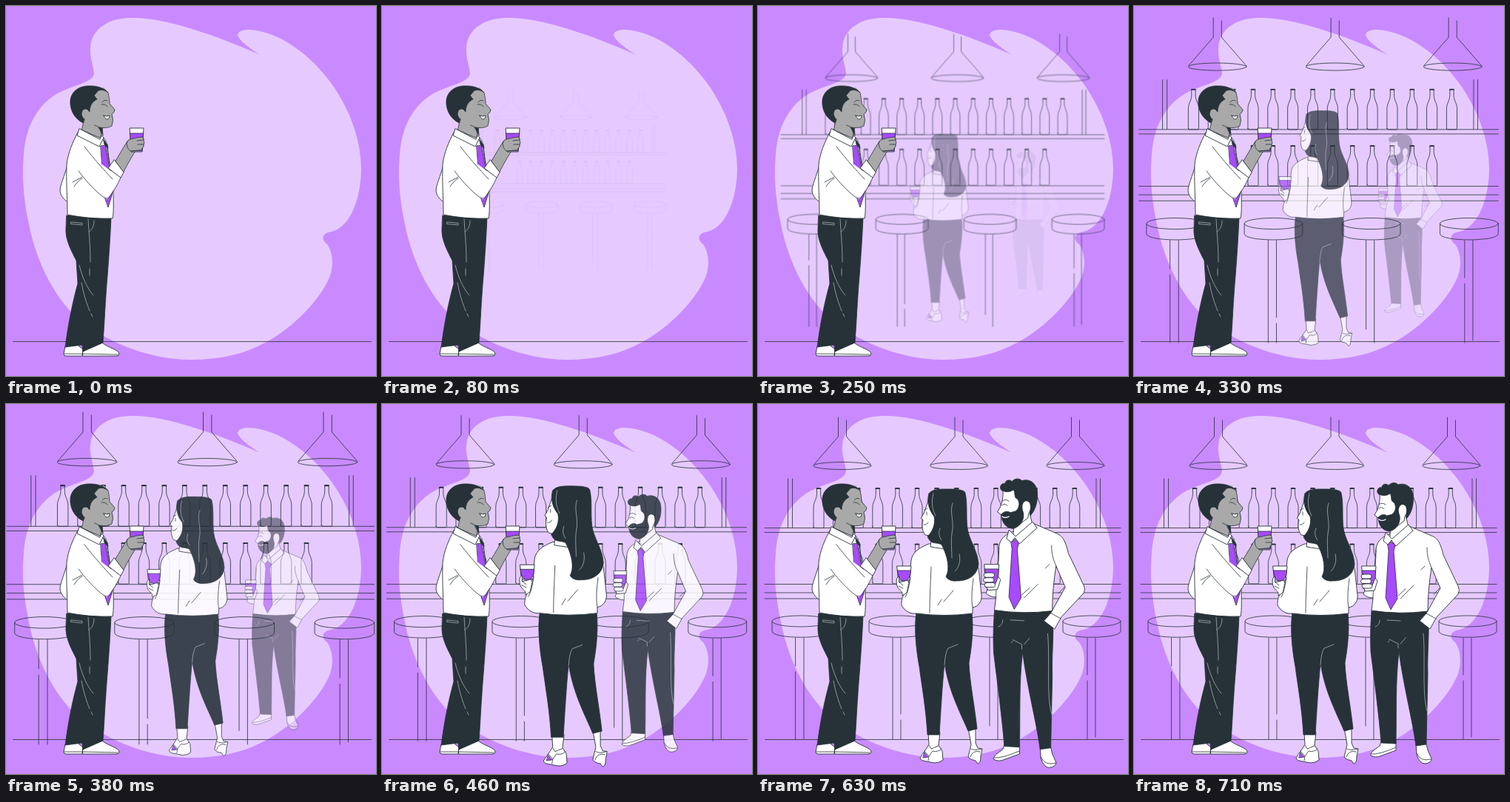
Write an HTML page without scripts that moves like this. It is 500 px wide and 500 px high and loops after 750 ms.

```html
<!DOCTYPE html>
<html lang="en">
<head>
<meta charset="utf-8">
<title>After-work drinks</title>
<style>
  html, body { margin: 0; width: 100%; height: 100%; overflow: hidden; background: #c98aff; }
  svg { display: block; width: 100%; height: 100%; stroke-linecap: round; stroke-linejoin: round; }

  .line { fill: none; stroke: #263238; stroke-width: .8; }
  .white { fill: #fff; stroke: #263238; stroke-width: .9; }
  .skin { fill: #a9a9a9; stroke: #263238; stroke-width: .8; }
  .dark { fill: #263238; stroke: #263238; stroke-width: .8; }
  .accent { fill: #a84aff; stroke: #263238; stroke-width: .8; }
  .seam { fill: none; stroke: #a9afb2; stroke-width: .8; }

  /* Progress is a property of its own, so lines are redrawn sharp at every scale */
  @property --p { syntax: "<number>"; inherits: false; initial-value: 1; }
  .pop {
    opacity: var(--p);
    transform: scale(calc(.5 + .5 * var(--p)));
    animation: 750ms cubic-bezier(.36, -.01, .5, 1.38) infinite;
  }
  #bar { transform-origin: 250px 236px; animation-name: bar-in; animation-timing-function: cubic-bezier(.332, -.01, .488, 1.38); }
  #woman { transform-origin: 245px 299.5px; animation-name: woman-in; }
  #guest { transform-origin: 373px 297px; animation-name: guest-in; }
  @keyframes bar-in { 0% { --p: 0; } 63.5%, 100% { --p: 1; } }
  @keyframes woman-in { 0%, 12% { --p: 0; } 78.4%, 100% { --p: 1; } }
  @keyframes guest-in { 0%, 24.9% { --p: 0; } 91.3%, 100% { --p: 1; } }
</style>
</head>
<body>
<svg viewBox="0 0 500 500">
  <defs>
    <g id="lamp">
      <path d="M-5.5 18V44L-38.5 82M5.5 22V44L38.5 82"/>
      <ellipse cy="83.5" rx="39" ry="5"/>
    </g>
    <g id="bottle">
      <path d="M-7 -2V-28C-7 -36 -3 -38 -2.6 -46V-54.5H2.6V-46C3 -38 7 -36 7 -28V-2Q7 -.5 5.5 -.5H-5.5Q-7 -.5 -7 -2Z"/>
      <path d="M-2.6 -53.8H2.6" stroke-width="1.6"/>
    </g>
    <g id="pair"><use href="#bottle"/><use href="#bottle" x="26.6"/></g>
    <g id="four"><use href="#pair"/><use href="#pair" x="53.2"/></g>
    <g id="eight"><use href="#four"/><use href="#four" x="106.4"/></g>
    <g id="seat">
      <ellipse cy="293.5" rx="39" ry="7.5"/>
      <path d="M-39 294V307C-39 318 39 318 39 307V294"/>
    </g>
    <rect id="finger" class="white" width="14" height="6" rx="3"/>
  </defs>

  <rect width="500" height="500" fill="#c98aff"/>
  <path fill="#e6caff" d="M114 57C115 30 140 16 170 16C215 15 290 42 343 66C330 57 317 49 313 40C313 34 320 32 328 32C372 34 415 70 440 105C468 145 480 185 480 222C479 262 465 302 435 306C427 309 426 316 434 322C441 332 444 350 437 367C425 396 385 440 340 460C305 477 260 480 230 477C180 472 135 452 100 425C60 390 38 335 30 290C22 250 22 225 24 200C27 158 47 125 83 112C101 105 118 101 119 91C118 80 113 70 114 57Z"/>
  <path class="line" d="M9.5 453.5H493.5"/>

  <g id="bar" class="pop line">
    <use href="#lamp" x="114"/><use href="#lamp" x="271.5"/><use href="#lamp" x="429"/>
    <path d="M40.5 101V167M46.500 101V167M457 101V167M462.500 101V167M9 167.500H490M9 173.500H490M9 243.500H490M9 255H490M9 263H490"/>
    <g transform="translate(82 168)">
      <use href="#eight"/><use href="#four" x="212.8"/><use href="#pair" x="319.2"/>
    </g>
    <g transform="translate(135.2 243.5)">
      <use href="#eight"/><use href="#pair" x="212.8"/><use href="#bottle" x="266"/>
    </g>
    <use href="#seat" x="58"/><use href="#seat" x="189"/><use href="#seat" x="320"/><use href="#seat" x="451"/>
    <path d="M50.5 316V354M50.5 362V453M62 316V453M182 316V453M193 316V419M193 427V453M313 316V435M324 316V453M445 316V366M445 374V453M456 316V450"/>
  </g>

  <g id="host">
    <path class="white" d="M83 215C79 230 73 242 73 250C74 258 80 263 85 266Z"/>
    <path class="white" d="M80 460L78 470Q78 473 81 473H103L104 464L94 456Z"/>
    <path class="white" d="M104 465L130 455C138 462 152 464 153 470Q153 473 149 473H104Z"/>
    <path class="line" d="M79 470H103M104 470L151 471"/>
    <path class="dark" d="M82 283L142 286C141 310 139 340 137 365C134 400 133 430 131 455L104 467L103 458L80 461C84 430 90 400 97 375L95 344C85 325 80 313 81 300Z"/>
    <path class="seam" d="M88 292L103 293.5V296L88 294.5ZM111 288C112 305 114 325 114 346M113 355V364M119 290C119 298 116 303 112 305M99 350C103 367 110 382 118 391M102 374C105 390 109 402 113 412M115 416L117 420"/>
    <path class="skin" d="M106 150L102 170L127 184L130 164Z"/>
    <path class="dark" d="M125 163L130 163L131 175Z"/>
    <path class="white" d="M97 171C90 184 84 198 82 214C81 235 83 260 83 282Q112 288 144 287C146 278 145 262 145 252L137 190L131 180L101 167Z"/>
    <path class="accent" d="M128 189L134 188L144 240L143 256L138 272L133 258Z"/>
    <path class="dark" d="M132 181L137 187L138 193L133 187Z"/>
    <path class="white" d="M99 166L96 175L126 190L132 178L129 175L127 180Z"/>
    <path class="line" d="M132 178L136 184M135 186C137 197 139 211 142 221"/>
    <path fill="#fff" d="M102 193L143 224L155 232C149 242 143 253 137 261C129 259 117 248 98 226Z"/>
    <path class="line" d="M106 190C112 198 126 215 144 234M98 223C111 240 121 250 130 257Q136 262 140 258C146 250 151 241 155 232M90 238L103 231M92 244C96 238 100 234 103 233"/>
    <path class="skin" d="M147 211C153 201 158 192 164 183L172 178L180 188C172 200 165 212 159 224Z"/>
    <path class="white" d="M146 208L138 219L155 232L159 225Z"/>
    <path class="white" d="M167.5 165H186L184 197H169.500Z"/>
    <path class="accent" d="M168 172H185.5L184 196H169.500Z"/>
    <path class="skin" d="M164 183C166 179 172 180 176 178L184 177Q187 178 186 182Q188 185 186 187Q187 191 184 192Q184 195 179 195L168 196C164 193 162 187 164 183Z"/>
    <path class="line" d="M177 182L186 181M178 187L186 187"/>
    <path fill="#a9a9a9" d="M115 115L132 110Q138 115 139 124L140 132L147 140Q147 144 143 146Q146 154 143 162Q136 166 126 164L105 157L103 140Z"/>
    <path class="line" d="M138 117Q140 125 140 132L147 140Q147 144 143 146Q146 154 143 162Q136 166 126 164L120 161M129 133Q134 132 137 136M130 130Q133 126 137 128"/>
    <path class="white" d="M132 148Q136 150 140 148Q140 153 136 153Q133 152 132 148Z"/>
    <path class="dark" d="M104 158C92 152 86 140 87 127C89 113 102 107 115 108C125 108 134 112 138 117Q132 112 125 114L119 121L123 126C117 129 113 134 113 143L110 140C102 139 100 148 106 153Z"/>
    <path fill="#a9a9a9" d="M111 141C104 136 100 145 105 151Q108 155 111 153Z"/>
  </g>

  <g id="woman" class="pop">
    <path class="white" d="M230 444L231 460C227 467 222 473 219 478Q219 481 223 482L238 485Q246 485 250 481L249 469L244 461L246 444Z"/>
    <path class="line" d="M225 469L231 476L236 469Q243 471 248 466M231 461L234 466L244 462M231 476L230 482"/>
    <path class="accent" d="M225 471L230 477L223 478Z"/>
    <path class="white" d="M284 438L288 460L284 477Q287 481 294 482L297 486Q301 486 301 476L303 466L297 465L294 458V438Z"/>
    <path class="line" d="M288 466Q293 469 302 466M287 477Q290 467 300 470"/>
    <path class="dark" d="M214 282H289C291 300 290 322 285 350C286 375 293 410 296 439L284 442C275 420 258 390 252 350C249 380 247 415 245 447H229C227 412 222 385 218 355C213 328 211 300 214 282Z"/>
    <path class="seam" d="M270 325L257 330Q253 336 252 352"/>
    <path class="white" d="M231 189C218 194 209 200 207 211C206 222 205 235 203 247C198 254 193 264 194 272C199 281 207 284 214 283Q252 288 290 283L290 275C298 274 303 266 302 258L298 222L284 200Z"/>
    <path class="line" d="M234 220C233 245 232 265 232 282M291 236C289 252 288 264 290 275M199 261C203 254 204 245 206 235M248 264L243 272M264 252L251 267"/>
    <path class="white" d="M188 219H207L205 238H190Z"/>
    <path class="accent" d="M188.5 225H206.500C206 235 202 240 197 239C191 238 189 233 188.500 225Z"/>
    <path class="white" d="M190 233C186 235 187 242 188 246C191 253 196 252 195 259L201 255L204 242Q203 237 199 239L191 241Z"/>
    <path class="line" d="M191 241L196 245M190 246L196 249"/>
    <path class="white" d="M231 124C230 134 226 141 225 146L220.500 154L223 157C221 164 222 173 226 177Q231 179 235 176L233 193L252 196L258 150Z"/>
    <path class="line" d="M228 146V150M225 143L229 141M224 163Q228 164 230 160"/>
    <path class="dark" d="M231 121C236 114 249 115 260 115C268 115 279 116 280 120C284 138 280 157 284 173C288 188 297 200 298 216C297 230 286 239 269 239C260 240 255 236 254 233C260 223 256 205 248 190C240 186 234 191 229 179C236 172 240 163 238 152C230 142 228 130 231 121Z"/>
    <path class="seam" d="M237 121C233 136 237 145 240 151M263 134C259 144 264 156 263 169C260 183 262 198 262 208M246 168C243 174 245 180 248 184M266 226C272 221 274 211 272 203"/>
  </g>

  <g id="guest" class="pop">
    <path class="white" d="M334 456L332 462C325 467 319 471 320 475Q326 479 335 475L354 468V456Z"/>
    <path class="line" d="M321 473Q331 474 354 464"/>
    <path class="white" d="M381 459L382 474Q386 486 393 486Q402 485 402 479L397 468L395 459Z"/>
    <path class="line" d="M382 472Q387 484 401 480"/>
    <path class="dark" d="M321 280L397 280C400 305 396 335 397 365L395 460L381 462C376 425 365 385 358 335C353 375 355 420 354 459L334 458C331 420 325 375 320 335C319 310 320 295 321 280Z"/>
    <path class="seam" d="M345 318L357 324V330M367 316L360 324M332 292Q332 299 326 301M391 310C394 345 389 390 396 415M342 292L360 293M345 320L343 322"/>
    <path class="white" d="M340 178C333 182 328 187 327 196L324 236L313 248L310 257Q315 262 323 262L321 279Q358 285 397 280C397 260 399 240 402 221L414 249L395 283L386 293L400 304L409 288L438 257Q441 252 438 246L418 204C414 187 410 181 402 178L374 166Z"/>
    <path class="line" d="M396 194C396 205 398 212 402 221M395 283L408 290M327 197C327 221 323 243 323 262M378 245L360 263M367 250L357 259M393 219L388 224M413 249L405 257"/>
    <path class="white" d="M347 166L345 187L371 167L367 150Z"/>
    <path class="white" d="M340 174L337 185L343 190L348 184L354 192L377 171L371 163L349 182Z"/>
    <path class="accent" d="M343 190L348 186L353 191L351 199L356 263L347 278L340 262L344 199Z"/>
    <path class="white" d="M308 219H327L325 249H310Z"/>
    <path class="accent" d="M308.5 225H326.500L325 249H310Z"/>
    <path class="white" d="M309 245H322L326 235L329 239L325 252L313 253Z"/>
    <use href="#finger" x="307" y="230"/><use href="#finger" x="306.5" y="236.500"/><use href="#finger" x="308" y="243"/>
    <path class="white" d="M332 121C333 130 331 137 329 143L325 150L330 154L335 166L349 170L365 158L369 130L360 115Z"/>
    <path class="dark" d="M331 122C326 119 330 111 335 113C335 108 341 107 344 110C349 105 354 106 357 109C366 106 375 111 377 122C379 137 374 149 368 155Q369 143 364 138Q358 139 359 151C361 163 352 171 345 172C334 171 330 161 330 153Q336 147 342 151L349 149C355 144 354 136 351 133C346 131 349 125 346 121Q339 126 331 122Z"/>
    <path fill="#fff" d="M359 150C355 140 361 132 367 138C370 145 367 153 361 154Z"/>
    <path class="line" d="M331 141Q335 138 338 142M331 136Q335 132 340 136"/>
    <path d="M331 156Q335 159 340 156" fill="none" stroke="#fff" stroke-width="1.2"/>
  </g>
</svg>
</body>
</html>
```
